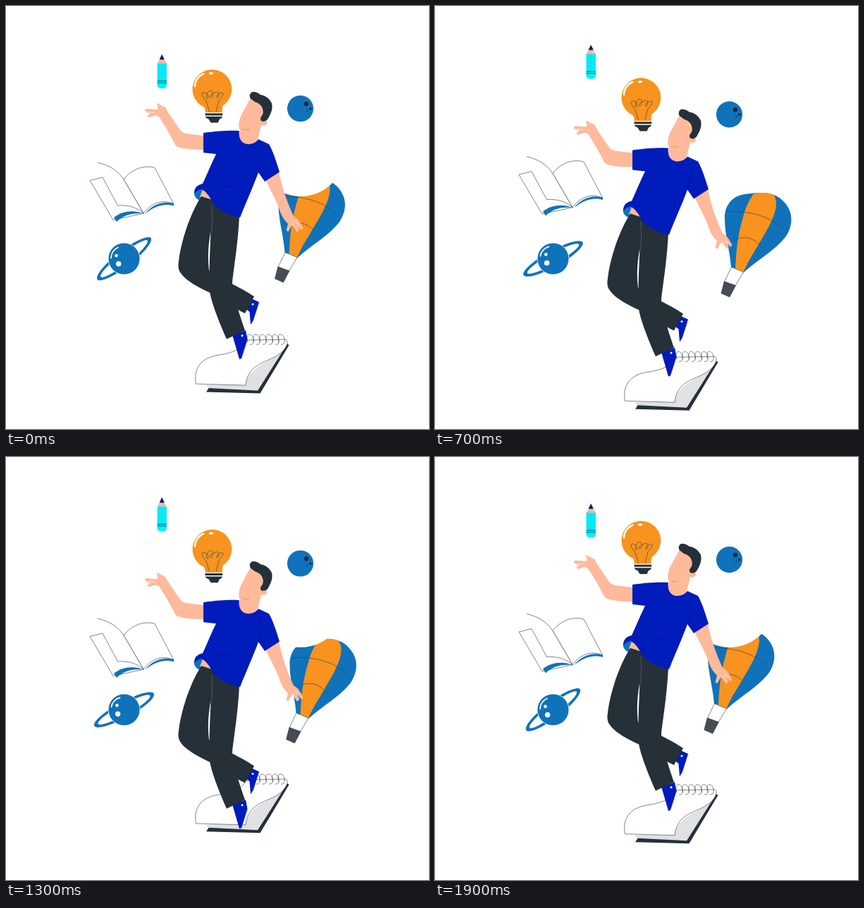
Recreate the animation shown at these times as an HTML page. Size 600 by 600 pixels, loop 2 s.

```html
<!DOCTYPE html>
<html lang="en">
<head>
<meta charset="utf-8">
<title>Juggling ideas</title>
<style>
html, body { margin: 0; width: 100%; height: 100%; overflow: hidden; background: #fff; }
svg { display: block; width: 100vw; height: 100vh; }
.blue { fill: #1072ba; }
.orange { fill: #f7931e; }
.dark { fill: #253038; }
.skin { fill: #ffb99b; }
.royal { fill: #001cba; }
.white { fill: #fff; }
.line, .page { fill: none; stroke: #3a444b; stroke-width: .65; stroke-linejoin: round; }
.page { fill: #fff; }
.gap { fill: none; stroke: #fff; stroke-width: .7; }
</style>
</head>
<body>
<svg viewBox="0 0 600 600">
  <g id="pencil">
    <path class="skin" d="M218 75H224.500L228 82H214.500Z"/>
    <path d="M221.200 68.500L224.700 75.500Q221 77 217.700 75.500Z" fill="#101c7c"/>
    <path d="M214.500 82Q216.700 80 219 82Q221.300 80 223.500 82Q226 80 228 82V113Q227 117 221.200 117Q215.500 117 214.500 113Z" fill="#06f0fb"/>
    <path d="M217.800 83V106M221.300 83V106M224.800 83V106" stroke="#16c3d6" stroke-width=".6"/>
    <path d="M214.500 106.500H228M214.500 109.200H228" stroke="#14596f" stroke-width=".9"/>
  </g>

  <g id="bulb">
    <path class="orange" d="M281 143.500A27.900 27.900 0 1 1 307.500 141.500Q306.500 146 306.500 151H282.800Q282.800 146 281 143.500Z"/>
    <path d="M268 114C268 106 273 99 280.500 96" fill="none" stroke="#fff" stroke-width="2.400" stroke-linecap="round"/>
    <ellipse class="white" cx="291" cy="95.500" rx="3.200" ry="1.700"/>
    <path class="line" d="M288.500 150L284 135C279 129 276 123 280 123C284 122 289 128 286 131C282 133 285 120 290 120C296 120 293 131 290 130C287 127 296 122 300 122C303 123 302 131 299 130C297 126 306 121 308 124C308 128 304 131 302 134L298 150"/>
    <path class="dark" d="M282.500 152.300H307.200V155.300H282.500ZM282.500 156.800H307.200Q306 160 303 160.500L300.500 165.500H290.500L287.500 160.500Q284 160 282.500 156.800Z"/>
  </g>

  <g id="book">
    <path class="page" d="M137 243L119 247.500L152 303.500L196 294"/>
    <path class="blue" d="M153 300C165 290 182 289 195 294.500C178 293 166 297 157 306Z"/>
    <path class="page" d="M167 246C178 231 196 225 211 229.500L238 281C220 272 204 282 195 294Z"/>
    <path class="blue" d="M197 294.500C208 281 223 276 238 280V283.500C223 279 210 285 197 294.500Z"/>
    <path class="white" d="M130 222C148 226 160 235 167 246L195 294C185 285 172 282 158.500 283Z"/>
    <path class="line" d="M130 222C148 226 160 235 167 246L195 294C185 285 172 282 158.500 283L137 243"/>
  </g>

  <g id="planet">
    <g transform="translate(167.500 358.500)">
      <path class="blue" fill-rule="evenodd" transform="rotate(-37.800)" d="M-48 0A48 11.200 0 0 1 48 0A48 11.200 0 0 1 -48 0ZM-42 0A42 7.300 0 0 0 42 0A42 7.300 0 0 0 -42 0Z"/>
      <circle class="blue" r="22.500" stroke="#fff" stroke-width=".8"/>
      <path d="M-18.500 -1C-18.500 -8 -14 -14 -8.500 -16" fill="none" stroke="#fff" stroke-width="1.700" stroke-linecap="round"/>
      <circle class="white" cx="-11" cy="-4.500" r="2.300"/>
      <circle class="white" cx="-7.800" cy="7.300" r="3.700"/>
    </g>
  </g>

  <g id="balloon">
    <path class="blue" d="M411 303C410 284 421 269 441 267C466 263 484 265 495 278C508 292 509 310 497 328C482 347 459 359 437 379L420 371C418 345 411 325 411 303Z"/>
    <path class="orange" d="M452 266.500Q467 263.500 480 267.500C492 284 474 313 461 335C451 352 443 364 437 379L426 374C427 350 429 327 436 303Q441 281 452 266.500Z"/>
    <path class="line" d="M414 292C438 290 472 295 493 316M422 335C432 325 452 326 464 343"/>
    <path class="page" d="M420.500 370.500L437.500 377.500L426 397L410.500 391Z"/>
    <path d="M410 390.500L427 396.500L418 413.500L405.500 408Z" fill="#454c54"/>
  </g>
  <circle class="white" cx="418" cy="207" r="63"/>

  <g id="moon">
    <circle class="blue" cx="417.500" cy="145.500" r="18.600"/>
    <circle cx="426" cy="138.700" r="3.200" fill="#1c2733"/>
    <circle cx="431.800" cy="145.700" r="1.800" fill="#1c2733"/>
    <circle cx="427.300" cy="148.500" r="1.100" fill="#1c2733"/>
  </g>

  <g id="pad">
    <path class="dark" d="M397 478L401.500 481L360.500 549.500L284 547.500L288.500 540.500L356 544Z"/>
    <path d="M282 538L340 536C346 507 384 505 398 481L357 545.500L288 542Z" fill="#e0e0e5"/>
    <path class="page" d="M269.500 536C265 511 280 498 302 495C322 492 337 486 340 474L397 473Q400 475 399 479C388 509 344 497 340 538Z"/>
    <path class="line" id="coils"/>
  </g>

  <g id="man">
    <path class="royal" d="M348 415L359 420L351 446L347 452L345.500 434L341 430Z"/>
    <path class="royal" d="M321 467L340 460L342.500 473L334 500L331 501Q327 487 322 470Z"/>
    <circle class="white" cx="350" cy="423" r="1.500"/>
    <circle class="white" cx="335" cy="467.500" r="1.500"/>
    <path d="M360 421L348 452M343 476L335 499" fill="none" stroke="#aab0c4" stroke-width=".6" stroke-dasharray="2 2"/>
    <path class="blue" d="M280 252C270 254 264 263 268 270Q272 277 278 275L284 262Z"/>
    <path class="skin" d="M279 260L294 272L296 280L275 271Z"/>
    <path class="dark" d="M277 270L296 276L288 335C286 355 287 366 288 375C302 386 331 398 352 412L339 436C320 427 305 415 288 406C270 398 254 388 248 379Q243 373 245 362C248 335 260 297 277 270Z"/>
    <path class="dark" d="M290 274L331 297C329 340 322 378 321 393C322 410 332 440 339 460L313 472.500C303 450 291 420 289 405C288 380 289 350 290 335Z"/>
    <path d="M291.500 282C294 300 292 318 289.500 336" fill="none" stroke="#66717a" stroke-width=".6"/>
    <path class="skin" d="M213.500 138.500C216 137 220 142 226 143.500L230 151L247 176Q250 180 256 181L281 184L280 204C262 204 243 202 240 197C233 182 223 166 217 157L212 155L203 158C199 157 201 154 205 152.500L198 150C196 147 198 145 203 146L214 147Q217 145 213.500 138.500Z"/>
    <path class="gap" d="M202 150L211 151"/>
    <path class="skin" d="M368 246L387 235C392 261 401 283 408 298C414 301 418 307 421.500 315L419 317L413 309L416.500 318L413.500 320L407 311L405 312L400.500 320L397.500 318.500L400 309Q392 301 389 292C384 276 375 262 368 246Z"/>
    <path class="gap" d="M411 306L419 317M406 309L413 320"/>
    <path class="skin" d="M347 130L357 134L366 143L364 160Q371 160 370 167Q367 171 362 169L357 189C354 199 333 199 330 188L332 176C329 171 330 163 334 154Z"/>
    <path class="dark" d="M346.500 131Q344 125 349 122Q355 121 361 126C369 127 374 132 377 138C379 147 375 154 371 161Q367 165 362 163Q360 160 362 157Q367 152 363 143Q360 138 353 136Z"/>
    <path d="M335 174.500Q340 177 345 174.500" fill="none" stroke="#d9a441" stroke-width="1"/>
    <path class="royal" d="M280 180C300 177 320 176 331 177C329 190 336 196 344 196C351 196 356 192 358 189L373 196C379 206 384 223 388 235.500L367 249L358 236C352 253 341 277 332 300C318 297 302 291 294 280C288 269 283 262 277 260Q271 261 267.500 266Q266 255 279 252C285 239 291 224 298 210L280 208Z"/>
    <path d="M358 236Q361 224 366 215M300 251Q314 259 328 254" fill="none" stroke="#000f8c" stroke-width=".6"/>
  </g>
</svg>
<script>
const LOOP = 2000, STEP = 100, LAG = 20;
const $ = id => document.getElementById(id);

$('coils').setAttribute('d', [346, 355, 364, 373, 382, 390]
  .map(x => `M${x - 3} 477C${x - 8} 463 ${x + 4} 463 ${x + 5} 473Q${x + 6} 481 ${x} 480`).join(''));

// 0 to 1 and back, once per period
const wave = (t, period) => (1 - Math.cos(2 * Math.PI * (t - LAG) / period)) / 2;

// Eased travel through [time, value] keys
function along(t, keys) {
  const i = keys.findIndex(k => k[0] > t);
  const [t0, a] = keys[i - 1], [t1, b] = keys[i];
  return a + (b - a) * (1 - Math.cos(Math.PI * (t - t0) / (t1 - t0))) / 2;
}

const drift = [[0, 0], [800, 1], [LOOP, 0]];
const padKeys = [[0, 0], [790, 25], [1410, -19.5], [LOOP, 0]];
const bookKeys = [[0, 0], [750, -8.5], [1400, 8], [LOOP, 0]];

const put = (id, value) => $(id).setAttribute('transform', value);
const move = (id, x, y) => put(id, `translate(${x.toFixed(2)} ${y.toFixed(2)})`);

function draw(t) {
  const slow = wave(t, LOOP), d = along(t, drift);
  move('man', 0, 32 * slow);
  move('bulb', 0, 15.5 * slow);
  move('pencil', 0, -19 * wave(t, LOOP / 2));
  put('planet', `rotate(${(11.4 * slow).toFixed(2)} 167.5 358.5)`);
  move('balloon', 25.5 * d - 24.5, 21.7 * d - 21);
  move('moon', 0, 8.7 * d);
  move('pad', 0, along(t, padKeys));
  move('book', 0, along(t, bookKeys));
}

const start = performance.now();
function tick() {
  const t = (performance.now() - start) % LOOP;
  draw(Math.floor(t / STEP) * STEP);
  requestAnimationFrame(tick);
}
tick();
</script>
</body>
</html>
```
